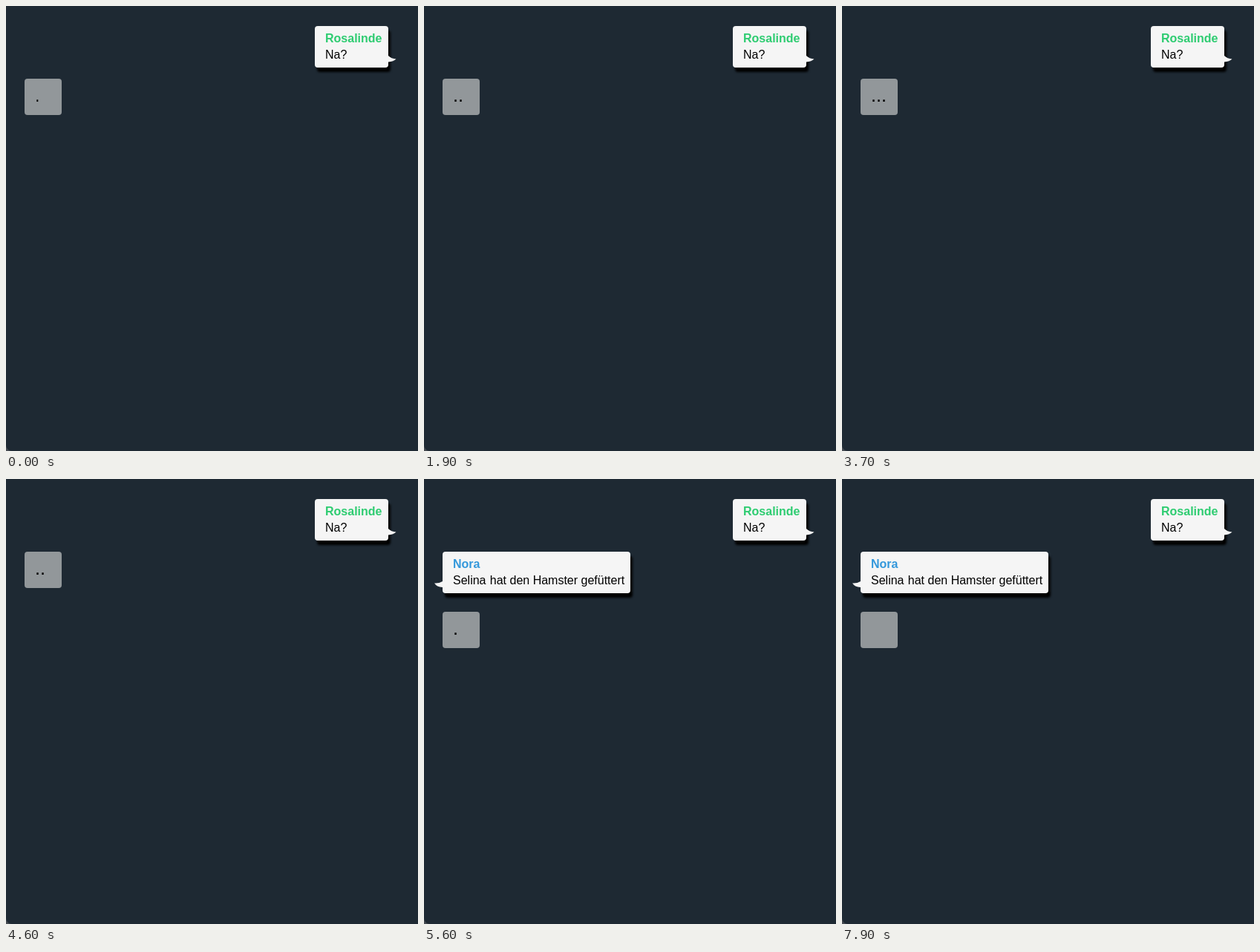
An HTML page that plays this animation: 555x600 px, repeating every 8 s.

```html
<!DOCTYPE html>
<html lang="de">
<head>
<meta charset="utf-8">
<title>Chat</title>
<style>
  html, body { margin: 0; width: 100%; height: 100%; overflow: hidden; background: #1e2933; }
  svg { display: block; font: 16px "Liberation Sans", Arial, sans-serif; }
  .card { fill: #f5f5f5; filter: drop-shadow(3px 6px 1.5px #000); }
  .tail { fill: #f5f5f5; }
  .name { font-weight: bold; }
  .dots { font-size: 25.2px; }
</style>
</head>
<body>
<svg width="555" height="600" viewBox="0 0 555 600">
  <defs>
    <clipPath id="reveal"><rect id="window" x="38" y="98" width="0" height="49"/></clipPath>
  </defs>
  <path d="M0 592A8 8 0 0 0 8 600H0Z" fill="#454b51"/>

  <g>
    <rect class="card" x="416" y="27" width="99" height="56" rx="4"/>
    <path class="tail" d="M515 67Q519 71 525.5 71.5Q522 75 515 75.5Z"/>
    <text class="name" x="430" y="49" fill="#2ecc71">Rosalinde</text>
    <text x="430" y="71">Na?</text>
  </g>

  <g id="reply">
    <rect class="card" x="25" y="98" width="253" height="56" rx="4"/>
    <path class="tail" d="M25 138Q20 141 14 140.5Q17 145.5 25 146Z"/>
    <text class="name" x="39" y="120" fill="#3498db">Nora</text>
    <text x="39" y="142">Selina<tspan x="88.8">hat den Hamster gefüttert</tspan></text>
  </g>

  <g id="typing">
    <rect x="25" y="98" width="50" height="49" rx="4" fill="#92979a"/>
    <text class="dots" x="39" y="129" clip-path="url(#reveal)">...</text>
  </g>
</svg>
<script>
  const LOOP = 8000, TICK = 100, REPLY_AT = 5600;
  const CYCLE = 1368, OFFSET = 338;   // dot reveal period and its phase at time 0
  const SPEED = 7 / 450;              // reveal speed in px per ms
  const get = id => document.getElementById(id);
  const reply = get("reply"), typing = get("typing"), reveal = get("window");

  function draw(now) {
    const t = Math.floor(now % LOOP / TICK) * TICK;
    const replied = t >= REPLY_AT;
    reply.setAttribute("visibility", replied ? "visible" : "hidden");
    typing.setAttribute("transform", `translate(0 ${replied ? 81 : 0})`);
    reveal.setAttribute("width", 0.14 + (t + OFFSET) % CYCLE * SPEED);
    requestAnimationFrame(draw);
  }
  draw(0);
</script>
</body>
</html>
```
